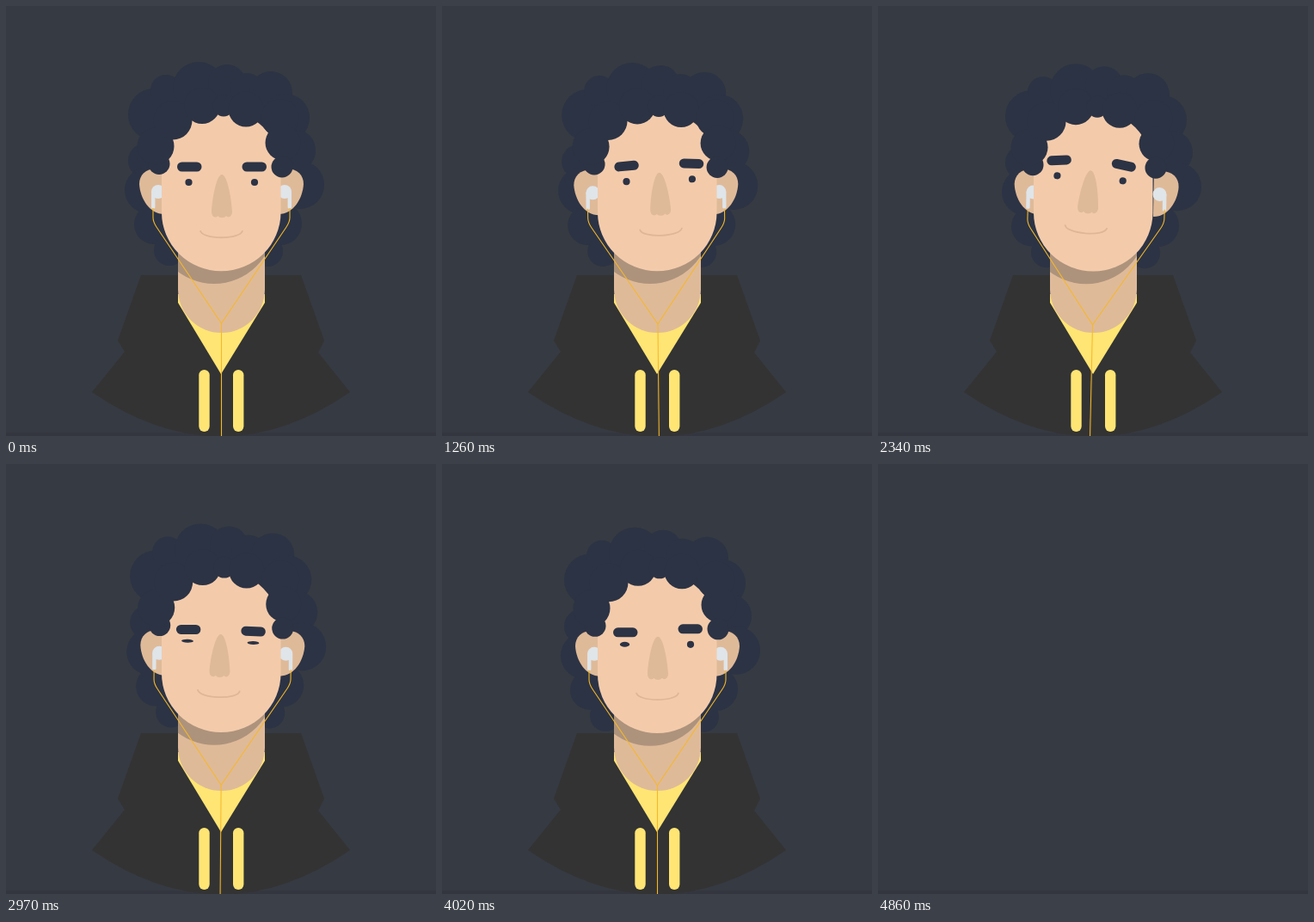
Recreate the animation shown at these times as an HTML page without scripts. Size 500x500 px, loop 4.89 s.

```html
<!DOCTYPE html>
<html lang="en">
<head>
<meta charset="utf-8">
<title>Listening</title>
<style>
  /* turn, bob, nod, blink and wink drive every moving part */
  @property --t { syntax: "<number>"; inherits: true; initial-value: 0; }
  @property --b { syntax: "<number>"; inherits: true; initial-value: 0; }
  @property --n { syntax: "<number>"; inherits: true; initial-value: 0; }
  @property --k { syntax: "<number>"; inherits: true; initial-value: 0; }
  @property --w { syntax: "<number>"; inherits: true; initial-value: 0; }

  html, body { margin: 0; width: 100%; height: 100%; overflow: hidden; background: #363a42; }
  svg { display: block; width: 100vw; height: 100vh; }

  .man {
    animation: turn 4.89s infinite, bob 4.89s ease-in-out infinite,
      blink 4.89s ease-in-out infinite, wink 4.89s ease-in-out infinite,
      show 4.89s step-end infinite;
  }
  .man * { --a: max(var(--t), -1 * var(--t)); }

  .hair { fill: #2c3344; }
  .skin { fill: #f3cbab; }
  .shade { fill: #dfba99; }
  .jacket { fill: #333; }
  .yellow { fill: #ffe574; }
  .pod { fill: #dfe5e9; }
  .cord { fill: none; stroke: #f5b829; stroke-width: 1.1; }

  .back { transform: translate(calc(var(--t) * -6px), calc((var(--b) + var(--n) + var(--a) * 2) * 1px)); }
  .front { transform: translate(calc(var(--t) * -2px), calc((var(--b) + var(--a)) * 1px)); }
  .skull { transform: translateY(calc(var(--b) * 1px)); }
  .ears {
    transform-origin: 250px 215px;
    transform: translate(calc(var(--t) * -3.5px), calc((var(--b) + var(--a) * 1.5) * 1px)) rotate(calc(var(--t) * -1deg));
  }
  .features {
    transform-origin: 250px 205px;
    transform: translate(calc(var(--t) * 4.2px), calc((var(--b) - var(--a) * 5) * 1px)) rotate(calc(var(--t) * -4.5deg));
  }
  .eye { transform: scale(calc(1 + var(--s) * .75), calc(1 - var(--s) * .56)); }
  .eye, .brow { --s: var(--k); transform-box: fill-box; transform-origin: center; }
  .eye.l { --s: max(var(--k), var(--w)); }
  .brow { transform: translateY(calc((var(--k) * 5 + var(--drop)) * 1px)) rotate(calc((var(--a) * -7.5 + var(--k) * 1.5) * var(--side) * 1deg)); }
  .brow.l { --side: 1; --drop: var(--w) * 8; }
  .brow.r { --side: -1; --drop: 0; }

  .cords { transform-origin: 250px 369px; transform: translate(calc(var(--t) * 1px), calc((var(--b) + var(--a) * 1.5) * 1px)); }
  .upper, .lower { transform-origin: 250px 369px; }
  .upper { transform: skewX(calc(var(--t) * 1.8deg)); }
  .lower { transform: skewX(calc(var(--t) * 1.3deg)); }

  @keyframes turn {
    0% { --t: 0; animation-timing-function: ease-in-out; }
    12.27% { --t: 1; }
    18.4% { --t: 1; animation-timing-function: cubic-bezier(.35, .1, .65, .9); }
    41.1% { --t: -1; }
    57.67% { --t: -1; animation-timing-function: cubic-bezier(.2, .6, .3, 1); }
    69.94%, 100% { --t: 0; }
  }
  @keyframes bob {
    0%, 26.6% { --b: 0; --n: 0; }
    33.74% { --b: 3.2; }
    41.1%, 47.24% { --b: 0; }
    50.92% { --b: 3.5; }
    54.6%, 57.67% { --b: 0; }
    60.74% { --b: 3.7; }
    68.7%, 70.55% { --b: 0; --n: 0; }
    76.07% { --b: -6; --n: -4; }
    82.2% { --b: 4.8; --n: 4; }
    90.8%, 100% { --b: -6; --n: -4; }
  }
  @keyframes blink {
    0%, 30.67% { --k: 0; }
    33.74% { --k: 1; }
    36.81%, 48.47% { --k: 0; }
    50.92% { --k: 1; }
    53.37%, 58.28% { --k: 0; }
    60.74% { --k: .92; }
    63.8%, 100% { --k: 0; }
  }
  @keyframes wink {
    0%, 79.75% { --w: 0; }
    84.66% { --w: 1; }
    89.57%, 100% { --w: 0; }
  }
  @keyframes show {
    0% { opacity: 1; }
    99.387%, 100% { opacity: 0; }
  }
</style>
</head>
<body>
<svg viewBox="0 0 500 500">
  <defs>
    <clipPath id="collar"><path d="M200 265H301V345L250 428 200 345Z"/></clipPath>
    <g id="ear">
      <path class="shade" d="M184 190C165 186 155 195 155 207C156 224 167 242 184 242Z"/>
      <g class="pod">
        <circle cx="177" cy="216" r="8"/>
        <rect x="169" y="215" width="4.4" height="20.5" rx="1.5"/>
      </g>
    </g>
    <path id="wire" class="cord" d="M171 235V246Q171 251 175 257L250.500 369"/>
  </defs>

  <rect width="500" height="500" fill="#363a42"/>
  <rect y="496" width="500" height="4" fill="#34363f"/>

  <g class="man">
    <g class="hair back">
      <ellipse cx="250" cy="190" rx="90" ry="105"/>
      <circle cx="172" cy="126" r="30"/>
      <circle cx="186" cy="98" r="18"/>
      <circle cx="224" cy="95" r="30"/>
      <circle cx="257" cy="90" r="22"/>
      <circle cx="280" cy="98" r="20"/>
      <circle cx="308" cy="101" r="25"/>
      <circle cx="325" cy="130" r="28"/>
      <circle cx="335" cy="168" r="25"/>
      <circle cx="342" cy="208" r="28"/>
      <circle cx="319" cy="253" r="25"/>
      <circle cx="304" cy="285" r="18"/>
      <circle cx="162" cy="180" r="20"/>
      <circle cx="165" cy="214" r="27"/>
      <circle cx="172" cy="254" r="23"/>
      <circle cx="190" cy="284" r="18"/>
    </g>

    <path class="jacket" d="M157 313H343L370 389 363 403 400 449Q250 552 100 449L138 402 130 389Z"/>
    <g clip-path="url(#collar)">
      <rect class="yellow" x="200" y="335" width="101" height="94"/>
      <path class="shade" d="M200 265H301V329.500A50.500 50.500 0 0 1 200 329.500Z"/>
      <ellipse class="skull" cx="242" cy="255" rx="69" ry="68" fill="#ae937c"/>
    </g>
    <rect class="yellow" x="224.300" y="423" width="12.400" height="72" rx="6.200"/>
    <rect class="yellow" x="264" y="423" width="12.400" height="72" rx="6.200"/>

    <g class="ears">
      <use href="#ear"/>
      <use href="#ear" transform="translate(501) scale(-1 1)"/>
    </g>

    <path class="skin skull" d="M181 240V190A69 69 0 0 1 319.500 190V240A69 68 0 0 1 181 240Z"/>

    <g class="features">
      <path class="shade" d="M251 196C245 196 240 222 239 239C239 246 244 247 246.500 244C248 247 254 247 256 244C258 247 263 245 263 239C262 222 257 196 251 196Z"/>
      <path d="M226 261C227 272 274 272 275 261" fill="none" stroke="#e0b796" stroke-width="1.800"/>
      <g class="hair">
        <circle class="eye l" cx="212.500" cy="205" r="4.100"/>
        <circle class="eye" cx="289" cy="205" r="4.100"/>
        <rect class="brow l" x="199" y="181.500" width="28.500" height="11" rx="5.500"/>
        <rect class="brow r" x="274.500" y="181.500" width="28.500" height="11" rx="5.500"/>
      </g>
    </g>

    <g class="hair front">
      <circle cx="178" cy="183.500" r="12.500"/>
      <circle cx="174" cy="163" r="21.500"/>
      <circle cx="194" cy="133" r="22.500"/>
      <circle cx="228" cy="116" r="21"/>
      <circle cx="253" cy="116" r="12.500"/>
      <circle cx="279" cy="120" r="20.500"/>
      <circle cx="318.500" cy="130" r="22"/>
      <circle cx="322" cy="159" r="20.500"/>
      <circle cx="321" cy="187" r="12.500"/>
    </g>

    <g class="cords">
      <g class="upper">
        <use href="#wire"/>
        <use href="#wire" transform="translate(501) scale(-1 1)"/>
      </g>
      <path class="cord lower" d="M250.500 369V515"/>
    </g>
  </g>
</svg>
</body>
</html>
```
